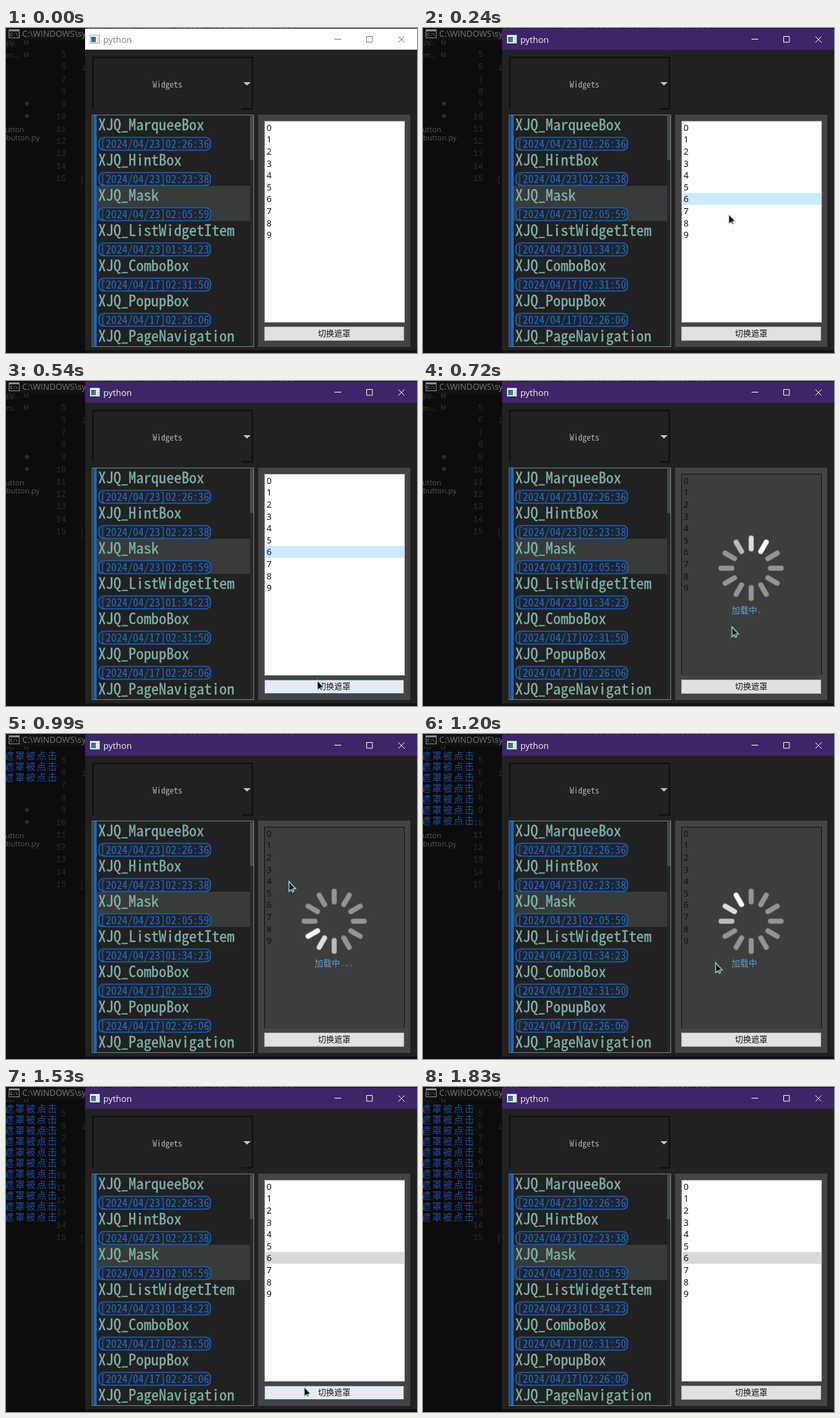
Recreate the animation shown at these times as an HTML page. Size 608 by 480 pixels, loop 1.86 s.

```html
<!DOCTYPE html>
<html lang="zh">
<head>
<meta charset="utf-8">
<title>Widget mask demo</title>
<style>
html, body { margin: 0; width: 100%; height: 100%; overflow: hidden; background: #0c0c0c; }
svg { display: block; width: 608px; height: 480px; }
.ui { font-family: "Open Sans", "Noto Sans", sans-serif; }
.mono { font-family: "Liberation Mono", monospace; }
.cjk { font-family: "Noto Sans CJK SC", "Noto Sans CJK", sans-serif; }
/* half-width Latin: every character is half an em */
.half {
  font-family: "Noto Sans Mono CJK SC", "Noto Sans CJK SC", monospace;
  font-feature-settings: "hwid";
}
.name { font-size: 22.4px; fill: #7db3ae; stroke: #7db3ae; stroke-width: .3; }
.time { font-size: 16.1px; fill: #2a6bc0; }
.badge { fill: #1d2530; stroke: #1761bd; stroke-width: 1.7; }
.digit { font: 13px "Noto Sans", sans-serif; }
.log { font-size: 14px; letter-spacing: 2px; fill: #25489c; }

/* one shared loop; hard switches hold their value until the next key */
#bar, #caption, #row, #button, #mask, #logClip { animation: 1860ms step-end infinite; }
#bar { animation-name: bar; }
#caption { animation-name: caption; }
#row { animation-name: row; }
#button { animation-name: button; }
#mask { animation-name: mask; }
#logClip { animation-name: log; }
#cursor { animation: move 1860ms linear infinite, show 1860ms step-end infinite; }
#spin { transform-origin: 485.5px 276.5px; animation: spin 169.09ms steps(12) -146.5ms infinite; }
#dotClip { transform-origin: 495px 0; animation: dots 169.09ms steps(4) -3ms infinite; }

@keyframes bar { 0% { fill: #fff } 6.4%, 100% { fill: #3e2569 } }
@keyframes caption { 0% { color: #777 } 6.4%, 100% { color: #f4f2f7 } }
@keyframes row { 0% { fill: #fff } 11.2% { fill: #cce8ff } 30.6%, 100% { fill: #d9d9d9 } }
@keyframes button {
  0%, 35.4%, 88.6%, 100% { fill: #e1e1e1; stroke: #adadad }
  28.9%, 77.3% { fill: #e5ecf5; stroke: #2f6fb4 }
}
@keyframes mask { 0%, 79%, 100% { visibility: hidden } 33.8% { visibility: visible } }
@keyframes log {
  0% { transform: translateY(0) }
  43.5% { transform: translateY(16px) }
  48.3% { transform: translateY(32px) }
  51.6% { transform: translateY(48px) }
  54.8% { transform: translateY(64px) }
  58% { transform: translateY(80px) }
  61.2% { transform: translateY(96px) }
  64.5% { transform: translateY(112px) }
  67.7% { transform: translateY(128px) }
  70.9% { transform: translateY(144px) }
  73.3% { transform: translateY(160px) }
  77.4%, 100% { transform: translateY(176px) }
}
@keyframes spin { to { transform: rotate(360deg) } }
@keyframes dots { from { transform: scaleX(0) } to { transform: scaleX(1) } }
@keyframes show { 0%, 93.5%, 100% { opacity: 0 } 3.2% { opacity: 1 } }
@keyframes move {
  0%, 4% { transform: translate(480px, 330px) }
  11.2% { transform: translate(450px, 250px) }
  20.97% { transform: translate(460px, 385px) }
  29% { transform: translate(460px, 441px) }
  31%, 33.8% { transform: translate(462px, 449px) }
  38.71% { transform: translate(456.5px, 363px) }
  46% { transform: translate(440px, 280px) }
  53.23% { transform: translate(418px, 216.5px) }
  62% { transform: translate(430px, 320px) }
  74.19% { transform: translate(441px, 402px) }
  77.5%, 82.26% { transform: translate(440.5px, 442px) }
  88% { transform: translate(441px, 445px) }
  93.5%, 100% { transform: translate(450px, 380px) }
}
</style>
</head>
<body>
<svg viewBox="0 0 608 480">
  <defs>
    <linearGradient id="edge">
      <stop offset="0" stop-color="#0f56a5"/>
      <stop offset="1" stop-color="#1a73d0"/>
    </linearGradient>
    <linearGradient id="app" x2="1" y2="1">
      <stop offset="0" stop-color="#2c5f9e"/>
      <stop offset="1" stop-color="#3c9a5c"/>
    </linearGradient>
    <clipPath id="listBox"><rect x="128" y="129" width="238" height="341"/></clipPath>
    <clipPath id="logBox"><rect id="logClip" x="0" y="-177" width="117" height="200"/></clipPath>
    <clipPath id="dotBox"><rect id="dotClip" x="495" y="325" width="25" height="25"/></clipPath>
  </defs>

  <!-- console over the editor -->
  <rect width="608" height="480" fill="#0c0c0c"/>
  <rect width="608" height="18" fill="#121212"/>
  <g id="editor" class="mono" font-size="12.5" fill="#2b2b2b">
    <text x="118" y="1" fill="#3c3c3c">odd, maps, Manage colour your widgets set</text>
    <text x="111" y="62">i</text>
    <text x="109" y="227">[</text>
    <circle cx="31" cy="112" r="3"/>
    <circle cx="31" cy="130" r="3"/>
  </g>
  <g class="ui" font-size="11" fill="#3a3a3a">
    <text y="25">py..</text><text x="26" y="25" font-size="9">M</text>
    <text y="44">m...</text><text x="26" y="43" font-size="9">M</text>
    <g fill="#575757"><text x="-1" y="154">utton</text><text y="166">button.py</text></g>
  </g>
  <rect x="4.5" y="2.5" width="15" height="12" fill="#0a0a0a" stroke="#8a8a8a"/>
  <path d="M4 4h16" stroke="#8a8a8a" stroke-width="2"/>
  <text class="mono" x="6" y="12" font-size="6.5" fill="#ccc">C:\</text>
  <text class="ui" x="24" y="13" font-size="12.5" fill="#777">C:\WINDOWS\system32</text>
  <g id="log" class="cjk" clip-path="url(#logBox)"></g>

  <!-- window -->
  <rect x="117" y="1" width="491" height="479" fill="#212121"/>
  <rect x="117" y="476" width="491" height="4" fill="#150e13"/>
  <rect id="bar" x="117" y="1" width="491" height="31"/>
  <rect x="124.5" y="10.5" width="14" height="12" fill="#f4f4f4" stroke="#a9adb5"/>
  <rect x="126" y="13" width="7" height="8" fill="url(#app)"/>
  <path d="M134.5 14h3M134.5 17h3M134.5 20h3" stroke="#b5b9be"/>
  <g id="caption" fill="none" stroke="currentColor">
    <text class="ui" x="144" y="21.5" font-size="12.8" fill="currentColor" stroke="none">python</text>
    <path d="M486 16.5h10M533.5 12.5h8.5v8.5h-8.5zM580.5 12.5l9 9M589.5 12.5l-9 9"/>
  </g>

  <!-- combo box -->
  <path d="M128.5 120V43.5h236v76h-16" fill="none" stroke="#080808" stroke-width="1.4"/>
  <text class="half" x="217" y="87.5" font-size="12.5" fill="#b2b2b2">Widgets</text>
  <path d="M351 80h11l-5.5 5z" fill="#c4c4c4"/>

  <!-- widget list -->
  <rect x="127.5" y="128.5" width="239" height="342" fill="#212121" stroke="#6a7f87"/>
  <rect x="129" y="129" width="5" height="341" fill="url(#edge)"/>
  <rect x="134" y="233" width="227" height="52" fill="#383b3b"/>
  <rect x="361" y="129" width="5" height="341" fill="#292929"/>
  <rect x="361" y="130" width="5" height="65" fill="#4b4b4b"/>
  <g id="list" class="half" clip-path="url(#listBox)"></g>

  <!-- demo panel -->
  <rect x="373" y="128" width="225" height="343" fill="#444"/>
  <rect x="382" y="137" width="208" height="298" fill="#fff"/>
  <path d="M382.5 434V137.5H590" fill="none" stroke="#828790"/>
  <path d="M382 434.5h207.5V138" fill="none" stroke="#c8c8c8"/>
  <rect id="row" x="384" y="243.6" width="205" height="17.6"/>
  <g id="digits" fill="#111"></g>
  <rect id="button" x="382.5" y="441.5" width="206" height="20"/>
  <text class="cjk" x="485.5" y="456" font-size="12" text-anchor="middle" fill="#111">切换遮罩</text>

  <g id="mask">
    <rect x="382.5" y="137.5" width="207" height="297" fill="#3c3e3e" stroke="#121313"/>
    <path d="M382 434.5h208" stroke="#3c3e3e"/>
    <g id="dimDigits" fill="#0d1024"></g>
    <g id="spin" stroke-width="7.5" stroke-linecap="round"></g>
    <text class="cjk" x="456.5" y="343" font-size="12.6" fill="#619fd8">加载中</text>
    <text class="half" x="494.5" y="343" font-size="12.6" fill="#619fd8" clip-path="url(#dotBox)">...</text>
  </g>

  <path id="cursor" d="M.5.5v15l3.4-3.1 1.9 3.7 2-1-1.8-3.6h4.4z" fill="#0a0a0a" stroke="#bdebf2" stroke-width="1.2"/>
</svg>
<script>
const NS = "http://www.w3.org/2000/svg";
const $ = id => document.getElementById(id);

function add(parent, tag, attrs, text = "") {
  const node = document.createElementNS(NS, tag);
  for (const key in attrs) node.setAttribute(key, attrs[key]);
  node.textContent = text;
  parent.append(node);
}

const items = [
  ["MarqueeBox", "23]02:26:36"],
  ["HintBox", "23]02:23:38"],
  ["Mask", "23]02:05:59"],
  ["ListWidgetItem", "23]01:34:23"],
  ["ComboBox", "17]02:31:50"],
  ["PopupBox", "17]02:26:06"],
  ["PageNavigation", "17]02:20:14"]
];
items.forEach(([name, stamp], i) => {
  const y = 52 * i;
  add($("list"), "text", { class: "name", x: 136.5, y: 150.5 + y }, "XJQ_" + name);
  add($("list"), "rect", { class: "badge", x: 137.5, y: 161.5 + y, width: 165, height: 19, rx: 7 });
  add($("list"), "text", { class: "time", x: 139.5, y: 177 + y }, "[2024/04/" + stamp);
});

for (const id of ["digits", "dimDigits"])
  for (let i = 0; i < 10; i++)
    add($(id), "text", { class: "digit", x: 385.5, y: 151.7 + 17.6 * i }, i);

for (let n = 5; n <= 15; n++)
  add($("editor"), "text", { x: 89, y: 43 + 18.3 * (n - 5), "text-anchor": "end" }, n);

// Each logged line hides the editor text under it.
for (let i = 0; i < 11; i++) {
  add($("log"), "rect", { y: 23 + 16 * i, width: 76, height: 16, fill: "#0c0c0c" });
  add($("log"), "text", { class: "log", x: -2.5, y: 36.5 + 16 * i }, "遮罩被点击");
}

// The head bar is white and the bars behind it fade to grey.
const tail = ["#fff", "#dcdcdc", "#bbb"];
for (let i = 0; i < 12; i++)
  add($("spin"), "path", {
    d: "M485.5 248v-16",
    stroke: tail[i] || "#949494",
    transform: `rotate(${-30 * i} 485.5 276.5)`
  });
</script>
</body>
</html>
```
